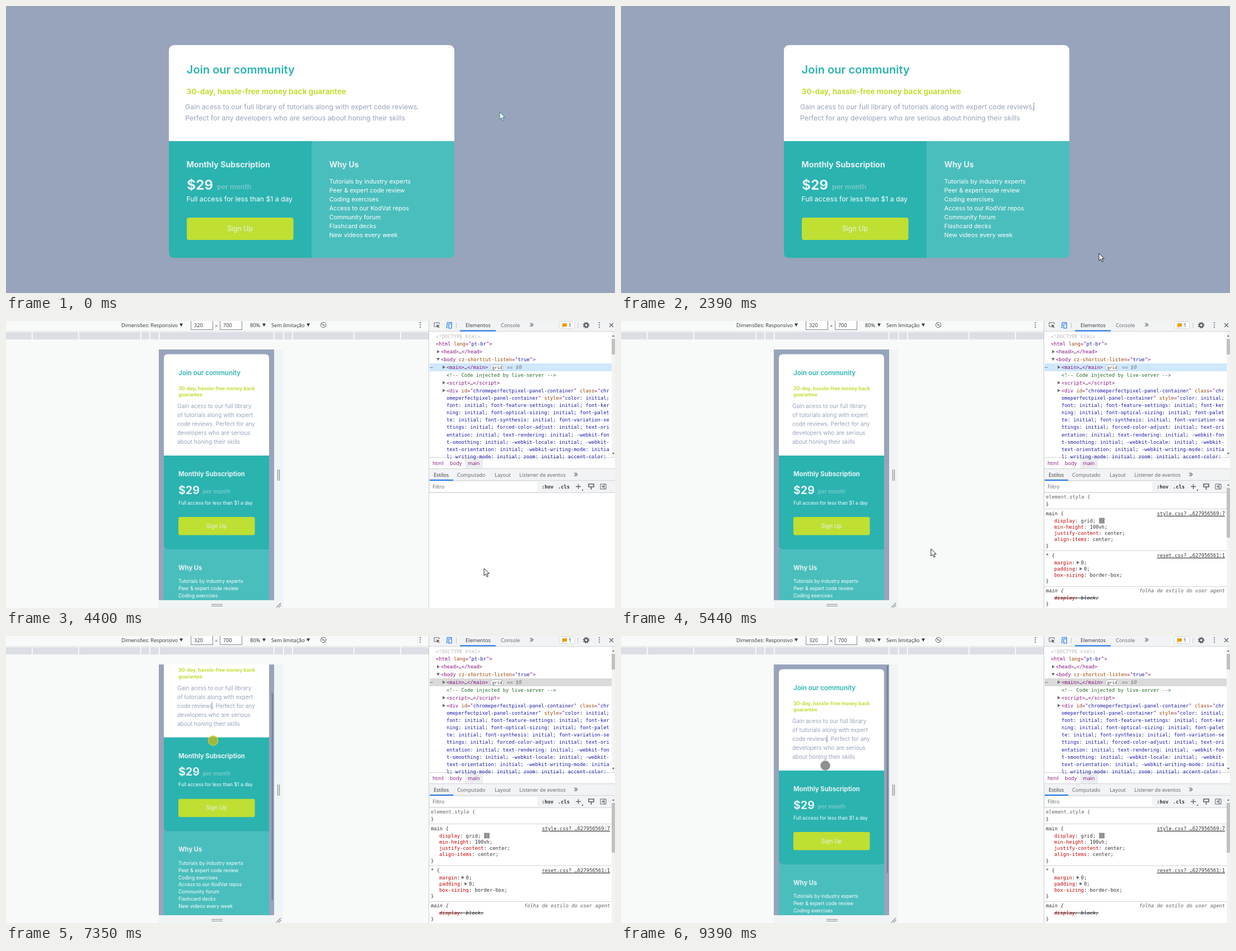
Animation, 1088 px wide and 514 px high, one loop 9450 ms. Source, as an HTML page:

```html
<!DOCTYPE html>
<html lang="en">
<head>
<meta charset="utf-8">
<title>Responsive card preview</title>
<style>
  html, body { margin: 0; width: 100%; height: 100%; overflow: hidden; background: #97a4bb; }
  svg { display: block; width: 100%; height: 100%; }
  text { white-space: pre; font-family: Inter, sans-serif; }
  .ui { font-family: "Open Sans", sans-serif; }
  .mono { font-family: "DejaVu Sans Mono", monospace; }
</style>
</head>
<body>
<svg id="stage" viewBox="0 0 1088 514"></svg>
<script>
const LOOP = 9450, MAX_SCROLL = 84.5;
const TEAL = '#2bb3b0', AQUA = '#4abebd', LIME = '#bfdf32', SLATE = '#97a4bb', PALE = '#e6f3f5';
const INK = '#303236', GRAY = '#5f6368', RULE = '#d0d3d8', BLUE = '#1a73e8';

// Drawing helpers returning SVG markup
const escapeText = s => s.replace(/&/g, '&amp;').replace(/</g, '&lt;');
const text = (x, y, s, size, fill, extra = '') =>
  `<text x="${x}" y="${y}" font-size="${size}" fill="${fill}" ${extra}>${escapeText(s)}</text>`;
const bold = (x, y, s, size, fill, weight = 700) => text(x, y, s, size, fill, `font-weight="${weight}"`);
const ui = (x, y, s, fill = INK, extra = '') => text(x, y, s, 9.15, fill, 'class="ui" ' + extra);
const rect = (x, y, w, h, fill, extra = '') =>
  `<rect x="${x}" y="${y}" width="${w}" height="${h}" fill="${fill}" ${extra}/>`;
const path = (d, fill, extra = '') => `<path d="${d}" fill="${fill}" ${extra}/>`;
const line = (d, stroke = GRAY, width = 1) => path(d, 'none', `stroke="${stroke}" stroke-width="${width}"`);
const group = (id, body, extra = '') => `<g id="${id}" ${extra}>${body}</g>`;
const code = (x, y, runs, extra = '') =>
  `<text class="mono" x="${x}" y="${y}" font-size="8.79" ${extra}>` +
  runs.map(([fill, s]) => `<tspan fill="${fill}">${escapeText(s)}</tspan>`).join('') + '</text>';
const down = (x, y, s = 3) => path(`M${x - s} ${y - s}h${2 * s}l${-s} ${s * 1.8}z`, INK);
const right = (x, y) => path(`M${x} ${y - 3}v6l5 -3z`, '#6e6e6e');
const dots = x => [3, 7, 11].map(y => `<circle cx="${x}" cy="${y}" r="1.1" fill="${GRAY}"/>`).join('');

const perks = ['Tutorials by industry experts', 'Peer & expert code review', 'Coding exercises',
  'Access to our KodVat repos', 'Community forum', 'Flashcard decks', 'New videos every week'];

function desktopCard() {
  return rect(291, 70, 510, 381, '#fff', 'rx="9"') +
    path('M291 242H546V451H300Q291 451 291 442Z', TEAL) +
    path('M546 242H801V442Q801 451 792 451H546Z', AQUA) +
    bold(322.5, 121, 'Join our community', 20.1, TEAL, 600) +
    bold(322.5, 158.3, '30-day, hassle-free money back guarantee', 13.5, LIME) +
    text(320, 185, 'Gain acess to our full library of tutorials along with expert code reviews.', 12.35, SLATE) +
    text(320, 205, 'Perfect for any developers who are serious about honing their skills', 12.35, SLATE) +
    bold(322.5, 288.5, 'Monthly Subscription', 14.2, PALE) +
    bold(323, 328.5, '$29', 24.4, PALE) +
    bold(377, 327.8, 'per month', 12.4, '#79cbca', 600) +
    text(322.5, 350, 'Full access for less than $1 a day', 12.2, '#fff') +
    rect(323, 379, 190.5, 40, LIME, 'rx="4"') +
    text(418, 403, 'Sign Up', 12.4, PALE, 'text-anchor="middle"') +
    bold(577.5, 288.5, 'Why Us', 14, PALE) +
    perks.map((s, i) => text(577.5, 317.6 + i * 16.05, s, 10.85, '#fff')).join('');
}

function mobileCard() {
  const intro = ['Gain acess to our full library', 'of tutorials along with expert',
    'code reviews. Perfect for any', 'developers who are serious', 'about honing their skills'];
  return path('M282 241V66.5Q282 59.5 289 59.5H463Q470 59.5 470 66.5V241Z', '#fff') +
    path('M282 409H470V568.5Q470 575.5 463 575.5H289Q282 575.5 282 568.5Z', AQUA) +
    path('M282 241H470V409H289Q282 409 282 402Z', TEAL) +
    bold(308, 96.6, 'Join our community', 11.55, TEAL, 600) +
    bold(308, 123.7, '30-day, hassle-free money back', 8.6, LIME) +
    bold(308, 135.3, 'guarantee', 8.6, LIME) +
    intro.map((s, i) => text(306, 156.4 + i * 16, s, 10, SLATE)).join('') +
    bold(308, 278, 'Monthly Subscription', 11.3, PALE) +
    bold(308, 309.5, '$29', 19.6, PALE) +
    bold(351.5, 309.2, 'per month', 10, '#79cbca', 600) +
    text(308, 328.6, 'Full access for less than $1 a day', 8.55, '#fff') +
    rect(308, 351, 136.5, 32.5, LIME, 'rx="3"') +
    text(376, 370.6, 'Sign Up', 9.8, PALE, 'text-anchor="middle"') +
    bold(308, 445.6, 'Why Us', 11.2, PALE) +
    perks.map((s, i) => text(308, 469.2 + i * 12.85, s, 8.65, '#fff')).join('') +
    group('mobileCaret', rect(367.5, 178, 1, 13, '#7686a2'));
}

const menuItems = [[203, 'Voltar', 'Alt+Seta para a esquerda'], [221.5, 'Avançar', 'Alt+Seta para a direita'],
  [240, 'Recarregar', 'Ctrl+R'], [267.5, 'Salvar como...', 'Ctrl+S'], [286, 'Imprimir...', 'Ctrl+P'],
  [304.5, 'Transmitir...'], [323, 'Pesquisar imagens com Zorvel Lupa'], [350, 'Enviar para seus dispositivos'],
  [369, 'Criar código QR para esta página'], [397.5, 'Traduzir para o português'],
  [424.5, 'Exibir código fonte da página', 'Ctrl+U'], [443, 'Inspecionar']];

function contextMenu() {
  return rect(779, 193, 312, 264, '#000', 'opacity=".35"') +
    rect(775.5, 189.5, 316, 265, '#fff', 'stroke="#b5b8bd"') +
    rect(776, 0, 312, 19, '#e8e9e9', 'id="hover"') +
    [252, 335, 383, 410].map(y => rect(776, y, 312, 1, '#dcdee1')).join('') +
    menuItems.map(([y, label, keys], i) => {
      const fill = i < 2 ? '#75777b' : INK;
      return ui(807, y + 3.3, label, fill) + (keys ? ui(1075, y + 3.3, keys, GRAY, 'text-anchor="end"') : '');
    }).join('') +
    line('M785 353V346H795M783 353.5H790M792 348h4v6h-4z', GRAY, 1.2) +
    [[784, 363], [791, 363], [784, 370]].map(([x, y]) => line(`M${x} ${y}h4.5v4.5h-4.5z`, GRAY, 1.4)).join('') +
    line('M791 371h2v2h2v2M796 370v2M791 375h1', GRAY, 1.4);
}

function deviceToolbar() {
  const ticks = [46, 129, 240, 256, 273, 478, 495, 511, 621, 704];
  return rect(0, 0, 755, 514, '#f8faf9') + rect(0, 18, 755, 1, '#e0e3e6') + rect(0, 20, 755, 13, '#dbdfe5') +
    ticks.map(x => rect(x, 20, 1.5, 13, '#fff')).join('') +
    ui(206, 11, 'Dimensões: Responsivo') + down(313, 7.5) +
    rect(330.5, -1, 39, 16.5, '#fff', 'stroke="#85888c"') + ui(336, 11, '320') +
    ui(373, 11.5, '×', GRAY) +
    rect(382.5, -1, 39, 16.5, '#fff', 'stroke="#85888c"') + ui(388, 11, '700') +
    ui(436, 11, '80%') + down(461, 7.5) + ui(474, 11, 'Sem limitação') + down(540, 7.5) +
    `<circle cx="567" cy="7" r="4.7" fill="none" stroke="${GRAY}"/>` + line('M563 3.5L571 10.5M565 7h4') + dots(740) +
    rect(273, 51, 222, 463, '#f1f4f4') + rect(273, 51, 206, 449, SLATE) +
    line('M485.5 266V286M488.5 266V286M367 507.5H387M367 510.5H387M483 513L491 505M487 513L491.5 508.5', '#85898e', 1.2);
}

function panelTabs() {
  return rect(755, 0, 333, 514, '#fff') + rect(755, 0, 1, 514, '#c9ccd1') +
    rect(756, 0, 332, 18, '#f1f3f4') + rect(756, 18, 332, 1, RULE) +
    line('M772 10H765V3H774V6') + path('M769 6l6 2.5-2.5.8 2 2.4-1 .8-2-2.3-1 2z', GRAY) +
    line('M788 3V12H786M788 2.5H796V5M791 5h5v8h-5z', BLUE, 1.2) + line('M804.5 3V13', '#c2c5ca') +
    ui(821, 11, 'Elementos') + rect(811, 16.5, 64, 2, BLUE) + ui(884, 11, 'Console', GRAY) +
    group('tabsEarly', ui(937, 11, 'Fontes', GRAY) + text(982, 11, '»', 14, '#5b86a8')) +
    group('tabsLate', text(935, 11, '»', 14, GRAY)) +
    group('badge', rect(988.5, 1.5, 27, 12, '#fff', 'rx="2" stroke="#d5d8dc"') +
      path('M994 4h8v6h-5l-3 2z', '#f29900') + ui(1005, 11, '1')) +
    line('M1022 3V13', '#c2c5ca') +
    `<circle cx="1036.5" cy="7.5" r="3.2" fill="none" stroke="${GRAY}" stroke-width="2.6"/>` +
    `<circle cx="1036.5" cy="7.5" r="5" fill="none" stroke="${GRAY}" stroke-width="1.6" stroke-dasharray="2 1.93"/>` +
    dots(1060) + line('M1078 4l7 7M1085 4l-7 7', GRAY, 1.3);
}

function panes() {
  return rect(756, 244, 332, 1, RULE) + rect(820, 245, 32, 19, '#eceef0') +
    [[762, 'html'], [793, 'body'], [825, 'main']].map(([x, s]) => ui(x, 258, s, '#881280')).join('') +
    rect(756, 264, 332, 22, '#f1f3f4') + rect(756, 264, 332, 1, RULE) + rect(756, 285, 332, 1, RULE) +
    [[764, 'Estilos', INK], [806, 'Computado', GRAY], [873, 'Layout', GRAY], [917, 'Listener de eventos', GRAY]]
      .map(([x, s, c]) => ui(x, 279, s, c)).join('') +
    text(1014, 279, '»', 14, GRAY) + rect(757, 284, 42, 2, BLUE) +
    rect(756, 286, 332, 21, '#f1f3f4') + rect(758, 288, 191, 17, '#fff') + ui(762, 300, 'Filtro', GRAY) +
    code(957, 299.5, [[INK, ':hov']], 'font-weight="bold"') + code(986, 299.5, [[INK, '.cls']], 'font-weight="bold"') +
    line('M1018 296.5h9M1022.5 292v9', GRAY, 1.3) + path('M1028 304h3v-3z', GRAY) +
    line('M1041 292h9v5h-9zM1045.5 297v5', GRAY, 1.7) +
    line('M1062 292h10v9h-10zM1069 292v9', GRAY) + path('M1067.5 294v5l-3.5-2.5z', GRAY) +
    rect(756, 307, 332, 1, RULE);
}

function domTree() {
  const tag = '#881280', attr = '#994500', value = '#1a1aa6', comment = '#236e25';
  const row = i => 30.6 + i * 13.86;
  const element = (name, i, x) => right(x - 7, row(i) - 3.2) + code(x, row(i), [[tag, `<${name}>`], [INK, '…'], [tag, `</${name}>`]]);
  const resets = ['font', 'font-feature-settings', 'font-kerning', 'font-optical-sizing', 'font-palette',
    'font-synthesis', 'font-variation-settings', 'forced-color-adjust', 'text-orientation', 'text-rendering',
    '-webkit-font-smoothing', '-webkit-locale', '-webkit-text-orientation', '-webkit-writing-mode',
    'writing-mode', 'zoom', 'accent-color'].map(p => p + ': initial;').join(' ');
  const wrapped = resets.match(/.{1,55}/g).slice(0, 8);
  return rect(757, 76, 325, 14, '#cfe8fc', 'id="selected"') +
    code(768, row(0), [['#b9b9b9', '<!DOCTYPE html>']]) +
    code(768, row(1), [[tag, '<html '], [attr, 'lang'], [tag, '="'], [value, 'pt-br'], [tag, '">']]) +
    element('head', 2, 777) + path(`M769 ${row(3) - 6}h6l-3 5z`, '#6e6e6e') +
    code(777, row(3), [[tag, '<body '], [attr, 'cz-shortcut-listen'], [tag, '="'], [value, 'true'], [tag, '">']]) +
    element('main', 4, 787) + code(757, row(4), [[GRAY, '⋯']]) +
    rect(865.5, 78.5, 23, 10, '#fff', 'rx="5" stroke="#b6bac0"') + text(868.5, 86.2, 'grid', 7.5, INK, 'class="mono"') +
    code(895, row(4), [['#74787d', '== $0']], 'font-style="italic"') +
    code(787, row(5), [[comment, '<!-- Code injected by live-server -->']]) +
    element('script', 6, 787) + right(780, row(7) - 3.2) +
    code(787, row(7), [[tag, '<div '], [attr, 'id'], [tag, '="'], [value, 'chromeperfectpixel-panel-container'],
      [tag, '" '], [attr, 'class'], [tag, '="'], [value, 'chr']]) +
    code(787, row(7) + 13.15, [[value, 'omeperfectpixel-panel-container'], [tag, '" '], [attr, 'style'], [tag, '="'],
      [value, 'color: initial;']]) +
    wrapped.map((s, i) => code(787, row(7) + (i + 2) * 13.15, [[value, s]])).join('') +
    rect(1082, 19, 6, 225, '#f3f3f3') + rect(1082, 32, 6, 28, '#c1c1c1') +
    path('M1083 28h4l-2-3zM1083 236h4l-2 3z', GRAY);
}

function stylesPane() {
  const prop = (y, name, val, arrow) => code(774, y + 3, [['#c80000', name], [INK, arrow ? ':  ' : ': '], [INK, val + ';']]) +
    (arrow ? right(774 + (name.length + 1) * 5.29 + 3, y) : '');
  const plain = (y, s, fill = INK, extra) => code(759, y + 3, [[fill, s]], extra);
  const link = (y, s) => code(1079, y + 3, [[INK, s]], 'text-anchor="end" text-decoration="underline"');
  return plain(315.3, 'element.style {', GRAY) + plain(328, '}') +
    plain(345, 'main {') + link(345, 'style.css?_…627956569:7') +
    prop(357.5, 'display', 'grid') + line('M855 353.5h3v3h-3zM860 353.5h3v3h-3zM855 358.5h3v3h-3zM860 358.5h3v3h-3z', GRAY, 1.3) +
    prop(369, 'min-height', '100vh') + prop(380, 'justify-content', 'center') + prop(391.3, 'align-items', 'center') +
    plain(403, '}') + plain(420, '* {') + link(420, 'reset.css?_…627956561:1') +
    prop(432.5, 'margin', '0', true) + prop(443.7, 'padding', '0', true) + prop(455, 'box-sizing', 'border-box') +
    plain(466, '}') + plain(483, 'main {', INK, 'font-style="italic"') +
    code(1079, 486, [[GRAY, 'folha de estilo do user agent']], 'font-style="italic" text-anchor="end"') +
    code(774, 498.7, [['#c80000', 'display'], [INK, ': block;']], 'font-style="italic" text-decoration="line-through"') +
    plain(507, '}') + [336, 411, 475].map(y => rect(756, y, 326, 1, RULE)).join('') +
    rect(1082, 287, 6, 227, '#f3f3f3') + rect(1082, 299, 6, 89, '#c1c1c1') + path('M1083 295h4l-2-3z', GRAY);
}

document.getElementById('stage').innerHTML =
  '<clipPath id="viewport"><rect x="273" y="51" width="206" height="449"/></clipPath>' +
  group('desktop', rect(0, 0, 1088, 514, SLATE) + desktopCard() +
    group('desktopCaret', rect(737, 173, 1, 15, '#7686a2')) + group('menu', contextMenu())) +
  group('tools', deviceToolbar() +
    `<g clip-path="url(#viewport)">${group('page', mobileCard())}${rect(474.7, 53, 2.3, 371, '#748096', 'id="thumb"')}</g>` +
    panelTabs() + group('panes', panes()) + group('dom', domTree()) + group('styles', stylesPane())) +
  group('touch', '<circle r="8.5" fill="#606060" fill-opacity=".7" stroke="#a6a6a6" stroke-opacity=".8"/>') +
  '<circle id="click" r="9.5" fill-opacity=".47"/>' +
  group('cursor', path('M0 0V13L3 10.2L5.2 15.2L7.3 14.2L5.2 9.4H9.3Z', '#fff', 'stroke-linejoin="round"'));

const el = Object.fromEntries([...document.querySelectorAll('[id]')].map(node => [node.id, node]));
const show = (id, on) => { el[id].style.display = on ? '' : 'none'; };
const between = (t, ...spans) => spans.some(([a, b]) => t >= a && t < b);
const move = (id, x, y) => el[id].setAttribute('transform', `translate(${x} ${y})`);

// Keys are [time, ...values], joined by straight runs
function sample(keys, t) {
  const next = keys.findIndex(k => k[0] > t);
  if (next === 0) return keys[0].slice(1);
  if (next < 0) return keys[keys.length - 1].slice(1);
  const [a, b] = [keys[next - 1], keys[next]], p = (t - a[0]) / (b[0] - a[0]);
  return a.slice(1).map((v, i) => v + (b[i + 1] - v) * p);
}

const pointerKeys = [[890, 882, 190], [1300, 864, 397], [1500, 854, 443], [4860, 854, 443], [5440, 554, 408],
  [5570, 533, 402], [5850, 371, 330], [6190, 371, 330], [6750, 368, 178], [7140, 369, 162], [7350, 370, 187],
  [7620, 372, 246], [8070, 377, 162], [8210, 378.5, 159], [8500, 375, 166], [8710, 374, 166], [9390, 365, 232]];
const scrollKeys = [[6190, 0], [6750, MAX_SCROLL], [7140, MAX_SCROLL], [7350, 59.5], [7620, 0],
  [8070, MAX_SCROLL], [8710, MAX_SCROLL], [9330, 0]];

function render(t) {
  const [x, y] = sample(pointerKeys, t), [scroll] = sample(scrollKeys, t);
  const inTools = t >= 2650, touching = inTools && x < 479;

  show('desktop', !inTools);
  show('tools', inTools);
  show('desktopCaret', t >= 230 && (t - 230) % 1060 < 530);
  show('menu', between(t, [280, 2100]));
  el.menu.setAttribute('opacity', Math.min(1, .4 + (t - 280) / 200));
  const hoverY = sample(pointerKeys, t - 60)[1];
  const hovered = menuItems.find(([row]) => Math.abs(row - hoverY) < 9.3);
  show('hover', hovered);
  if (hovered) el.hover.setAttribute('y', hovered[0] - 9.5);

  show('page', t >= 3120);
  show('thumb', between(t, [2850, 3610], [6190, LOOP]));
  show('mobileCaret', t >= 6190 && (t - 6190) % 1060 < 530);
  show('panes', t >= 3610);
  show('tabsEarly', t < 3880);
  show('tabsLate', t >= 3880);
  show('dom', t >= 4400);
  show('badge', t >= 4400);
  show('styles', t >= 4660);
  el.selected.setAttribute('fill', t < 6190 ? '#cfe8fc' : '#dadada');
  move('page', 0, -scroll);
  move('thumb', 0, scroll * .83);

  show('cursor', !touching);
  show('touch', touching);
  for (const id of ['cursor', 'touch', 'click']) move(id, x, y);
  el.cursor.setAttribute('stroke', t < 280 ? '#2f7f86' : '#222');
  show('click', between(t, [140, 280], [1830, 1900], [6190, 6850], [7140, 8350], [8710, 9330]));
  el.click.setAttribute('fill', t < 280 ? '#f00' : '#ff0');
}

function tick() {
  render(performance.now() % LOOP);
  requestAnimationFrame(tick);
}
tick();
</script>
</body>
</html>
```
